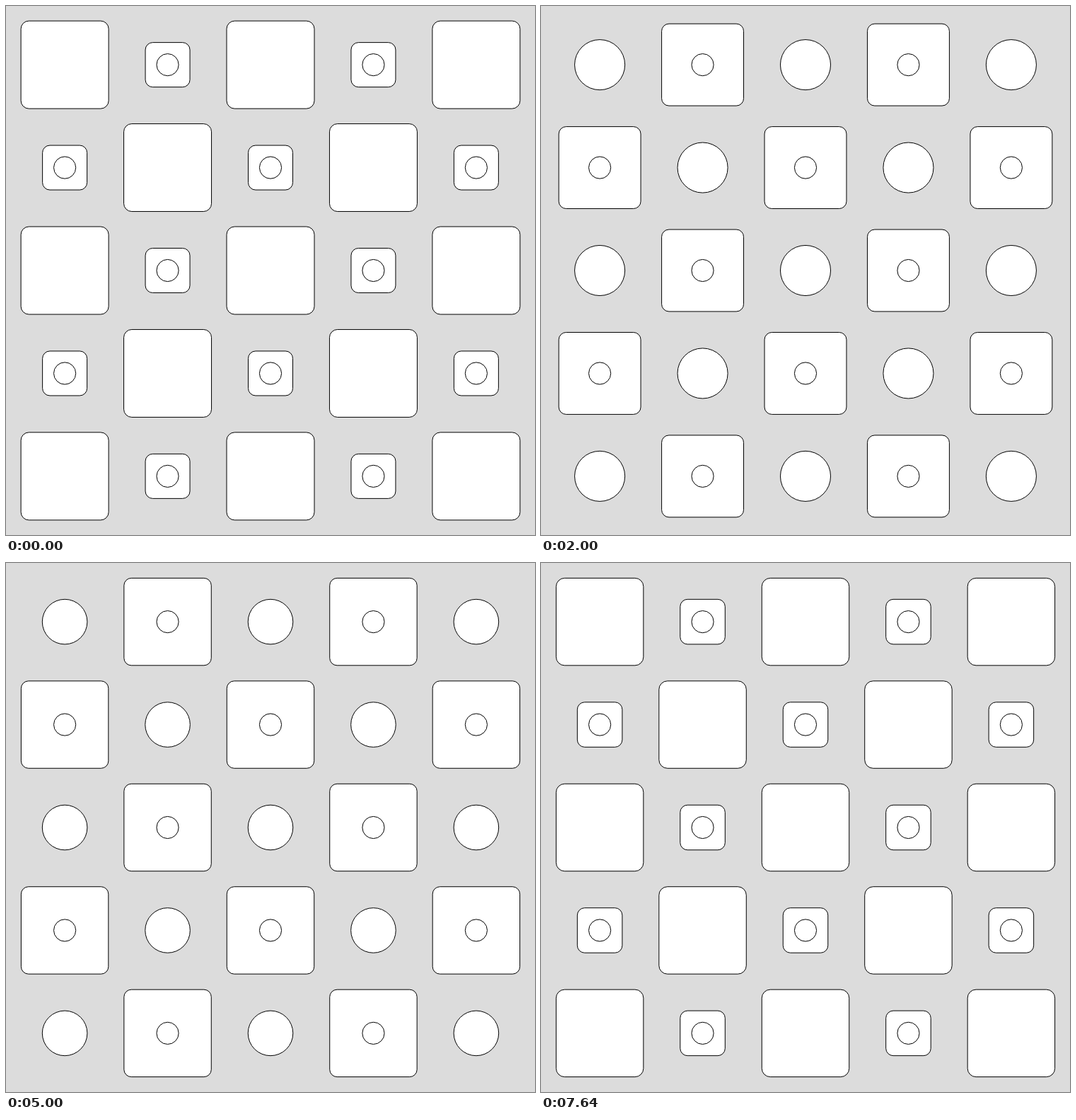
An HTML page that plays this animation: 748x748 px, repeating every 7.68 s.

```html
<!DOCTYPE html>
<html lang="en">
<head>
<meta charset="utf-8">
<title>Breathing checkerboard</title>
<style>
  html, body { margin: 0; width: 100%; height: 100%; overflow: hidden; background: #dcdcdc; }
  svg { display: block; width: 100%; height: 100%; fill: #fff; stroke: #000; stroke-width: 1; }
</style>
</head>
<body>
<svg id="stage" viewBox="0 0 748 748"></svg>
<script>
const STAGE = 748, LOOP = 7680, GRID = 5;
const BIG = STAGE / 6, SMALL = BIG / 2, GAP = BIG / 6, CORNER = BIG / 12;
const MAX_CORNER = BIG * 0.75;
const RISE = 1560, HALF_WAVE = 4754, SOFTNESS = 0.185;

const stage = document.getElementById('stage');

function add(name, attrs) {
  const node = document.createElementNS('http://www.w3.org/2000/svg', name);
  for (const key in attrs) node.setAttribute(key, attrs[key]);
  return stage.appendChild(node);
}

const center = i => GAP + BIG / 2 + i * (BIG + GAP);
const mix = (a, b, p) => a + (b - a) * p;

const tiles = [];
for (let row = 0; row < GRID; row++) {
  for (let col = 0; col < GRID; col++) {
    const x = center(col), y = center(row), dotted = (row + col) % 2 === 1;
    tiles.push({ x, y, dotted, node: add('rect', {}) });
    if (dotted) add('circle', { cx: x, cy: y, r: BIG / 8 });
  }
}

// Softened square wave between 0 and 1
function progress(time) {
  const wave = Math.sin(Math.PI * (time - RISE) / HALF_WAVE);
  return 0.5 + Math.atan(wave / SOFTNESS) / Math.atan(1 / SOFTNESS) / 2;
}

function setSquare({ node, x, y }, size, corner) {
  node.setAttribute('x', x - size / 2);
  node.setAttribute('y', y - size / 2);
  node.setAttribute('width', size);
  node.setAttribute('height', size);
  node.setAttribute('rx', Math.min(corner, size / 2));
}

function draw(time) {
  const p = progress(time);
  for (const tile of tiles) {
    if (tile.dotted) setSquare(tile, mix(SMALL, BIG, p), CORNER);
    else setSquare(tile, mix(BIG, SMALL, p), mix(CORNER, MAX_CORNER, p));
  }
}

const start = performance.now();
function tick() {
  draw((performance.now() - start) % LOOP);
  requestAnimationFrame(tick);
}
draw(0);
requestAnimationFrame(tick);
</script>
</body>
</html>
```
